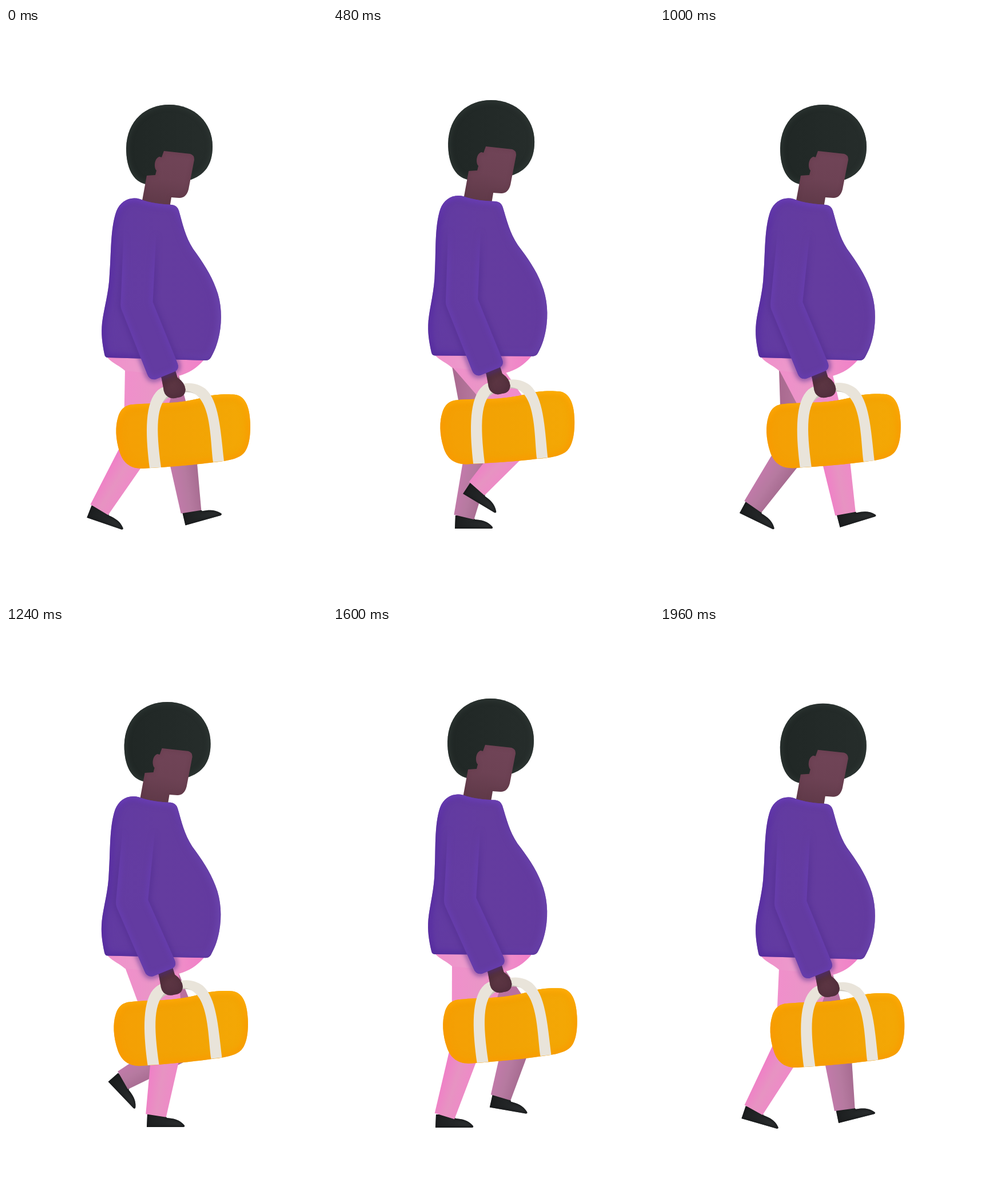
Animation, 561 px wide and 998 px high, one loop 2000 ms. Source, as an HTML page with a canvas:

```html
<!DOCTYPE html>
<html lang="en">
<head>
<meta charset="utf-8">
<title>Walk cycle</title>
<style>
html, body { margin: 0; width: 100%; height: 100%; overflow: hidden; background: #fff; }
canvas { display: block; }
</style>
</head>
<body>
<canvas id="stage" width="561" height="998"></canvas>
<script>
const ctx = document.getElementById('stage').getContext('2d');
const LOOP = 2000, STEP = 40, RAD = Math.PI / 180, SHIN = 135;

// One stride, shared by both legs
const STRIDE = [
  { t: 0, x: 163, y: 842, foot: 19, shin: 31 },
  { t: 90, x: 164, y: 827, foot: 36, shin: 41 },
  { t: 280, x: 196, y: 792, foot: 47, shin: 61 },
  { t: 680, x: 301, y: 826, foot: 6, shin: 12 },
  { t: 1000, x: 324, y: 849, foot: -17, shin: -10 },
  { t: 1240, x: 262, y: 854, foot: 0, shin: 9 },
  { t: 1600, x: 195, y: 855, foot: 0, shin: 17 }
];

const shape = d => new Path2D(d);
const TORSO = shape('M178 576Q173 576 172 570C168 550 166 535 168 515C171 490 180 462 181 430C184 395 182 350 193 320C200 303 216 294 234 299C252 306 272 308 290 309Q299 310 302 319C309 343 313 364 327 386C343 408 358 430 367 455C377 480 378 510 373 535C369 555 364 565 358 576Q355 581 349 581Z');
const HAIR = shape('M244 273C222 268 210 245 210 210C211 161 245 134 285 134C330 134 361 166 361 207C361 240 346 258 320 266Z');
const FACE = shape('M276 215L322 220Q329 222 329 230L319 282Q315 297 303 297L289 296L285 320L235 318L246 258L261 257L263 249C258 244 259 228 268 225L272 226Z');
const PELVIS = shape('M176 570L178 577C188 587 198 590 208 599L302 608C320 603 334 594 346 580L346 570Z');
const SHOE = shape('M-15 -3L-16 20L48 20Q52 19 49 16C41 7 31 5 19 4L15 -3Z');
const HAND = shape('M270 606L296 598L300 611Q313 620 314 632Q313 645 300 646Q290 649 284 645Q276 641 275 628L272 612Z');
const BAG = shape('M222 658C262 654 290 659 340 647C362 640 385 640 400 641C418 643 426 662 427 690C428 715 424 735 415 744C405 754 385 757 365 759C330 764 275 768 240 770C215 771 204 757 199 742C191 718 191 695 196 680C201 664 210 659 222 658Z');
const STRAP_L = shape('M251 769C245 720 241 662 262 637Q270 627 284 625L286 640C262 658 262 700 271 768Z');
const STRAP_R = shape('M304 624C318 618 336 621 349 631C372 652 375 700 381 757L362 759C356 710 360 630 306 634Z');
const STRAP_BACK = shape('M271 652Q282 640 298 637Q322 626 342 642');

const NEAR = { thigh: ['#f08fcb', '#ea95c7', '#f08cca'], shin: ['#f07fc7', '#e793c2', '#ee8ac7'] };
const FAR = { thigh: ['#a9698f', '#b87a9f', '#b9709f'], shin: ['#c37aab', '#b67aa0', '#a66b90'] };

// Cosine over the loop, peaking at the given time
const wave = (t, peak) => Math.cos((t - peak) * 2 * Math.PI / LOOP);

// Body height: two bobs per loop, a slow rise and a quicker fall
function lift(t) {
  const a = 4 * Math.PI * t / LOOP;
  return (1 - Math.cos(a - .28 * (1 - Math.cos(a)))) / 2;
}

// Smooth path through the stride that comes to rest at each turning point
function stride(t) {
  t = (t + LOOP) % LOOP;
  const n = STRIDE.length, out = {};
  const at = i => {
    const k = (i + n) % n;
    return { ...STRIDE[k], t: STRIDE[k].t + LOOP * Math.floor(i / n) };
  };
  let i = n - 1;
  while (STRIDE[i].t > t) i--;
  const [a, b, c, d] = [at(i - 1), at(i), at(i + 1), at(i + 2)];
  const h = c.t - b.t, u = (t - b.t) / h;
  for (const key of ['x', 'y', 'foot', 'shin']) {
    const slope = (p, q, r) => (q[key] - p[key]) * (r[key] - q[key]) > 0
      ? h * (r[key] - p[key]) / (r.t - p.t) : 0;
    const m = slope(a, b, c), k = slope(b, c, d), gap = c[key] - b[key];
    out[key] = b[key] + u * (m + u * (3 * gap - 2 * m - k + u * (m + k - 2 * gap)));
  }
  return out;
}

function ramp(x0, y0, x1, y1, ...colors) {
  const g = ctx.createLinearGradient(x0, y0, x1, y1);
  colors.forEach((c, i) => g.addColorStop(i / (colors.length - 1), c));
  return g;
}

function fill(path, style) {
  ctx.fillStyle = style;
  ctx.fill(path);
}

// Soft shading along an outline, kept inside the clip path
function rim(path, style, width, blur, clip = path) {
  ctx.save();
  ctx.clip(clip, 'evenodd');
  ctx.filter = `blur(${blur}px)`;
  ctx.strokeStyle = style;
  ctx.lineWidth = width;
  ctx.stroke(path);
  ctx.restore();
}

function place(x, y, deg, px, py, draw) {
  ctx.save();
  ctx.translate(x + px, y + py);
  ctx.rotate(deg * RAD);
  ctx.translate(-px, -py);
  draw();
  ctx.restore();
}

function poly(...pts) {
  const p = new Path2D();
  pts.forEach(([x, y]) => p.lineTo(x, y));
  p.closePath();
  return p;
}

function leg({ x, y, foot, shin }, dy, tone) {
  const s = Math.sin(shin * RAD), c = Math.cos(shin * RAD);
  const kx = x + SHIN * s, ky = y - SHIN * c;
  const dx = kx - 246, dh = ky - 589 - dy, len = Math.hypot(dx, dh);
  const ux = dx / len * 27, uy = dh / len * 27;
  const side = (px, py, w) => [px + c * w, py + s * w];

  place(x, y, foot, 0, 0, () => {
    fill(SHOE, ramp(-16, 0, 50, 10, '#1c1e1f', '#232627', '#2e3132'));
    rim(SHOE, '#17191a', 4, 2);
  });

  const thigh = poly([208, 597 + dy], [kx - uy, ky + ux], [kx + uy, ky - ux], [302, 607 + dy]);
  fill(thigh, ramp(208, 0, 302, 0, ...tone.thigh));
  const knee = new Path2D();
  knee.arc(kx, ky, 27, 0, 7);
  fill(knee, tone.thigh[1]);

  const calf = poly(side(kx, ky, -27), side(x, y, -18), side(x, y, 18), side(kx, ky, 27));
  fill(calf, ramp(...side(x, y, -24), ...side(x, y, 24), ...tone.shin));
}

function head() {
  fill(HAIR, ramp(210, 0, 361, 0, '#202725', '#232a28', '#262d2b'));
  rim(HAIR, '#2f3835', 6, 4);
  fill(FACE, ramp(285, 215, 265, 310, '#704457', '#6d4254', '#5f3948'));
  rim(FACE, 'rgba(88,48,62,.4)', 3, 3);
}

function torso() {
  fill(TORSO, ramp(170, 0, 376, 0, '#613aa2', '#643c9f', '#633a9f'));
  rim(TORSO, ramp(170, 0, 376, 0, '#5529a2', '#6038a6', '#6c46b0'), 10, 6);
  rim(TORSO, ramp(0, 298, 0, 345, 'rgba(116,70,196,.7)', 'rgba(116,70,196,0)'), 8, 4);
  rim(TORSO, ramp(0, 555, 0, 580, 'rgba(72,38,136,0)', 'rgba(72,38,136,.5)'), 4, 3);
}

// Shoulder, elbow and wrist each carry their own offset
function arm(sx, sy, ex, ey, wx, wy) {
  const p = new Path2D();
  p.moveTo(206 + sx, 350 + sy);
  p.lineTo(201 + ex, 480 + ey);
  p.quadraticCurveTo(200 + ex, 488 + ey, 204 + ex, 496 + ey);
  p.lineTo(247 + wx, 605 + wy);
  p.quadraticCurveTo(251 + wx, 616 + wy, 262 + wx, 614 + wy);
  p.lineTo(294 + wx, 601 + wy);
  p.quadraticCurveTo(304 + wx, 597 + wy, 300 + wx, 586 + wy);
  p.lineTo(257 + ex, 479 + ey);
  p.lineTo(263 + sx, 350 + sy);
  p.closePath();
  const outside = new Path2D(p);
  outside.rect(0, 0, 561, 998);
  const fade = rgb => ramp(0, 358 + sy, 0, 430 + sy, `rgba(${rgb},0)`, `rgba(${rgb},.7)`);
  rim(p, fade('80,44,144'), 7, 4, outside);
  fill(p, fade('100,60,162'));
  fill(p, ramp(0, 450, 0, 500, 'rgba(99,59,161,0)', '#633ba1'));
  ctx.save();
  ctx.clip(p);
  rim(p, ramp(0, 358 + sy, 0, 430 + sy, 'rgba(104,62,180,0)', 'rgba(104,62,180,.8)'), 8, 4);
  ctx.restore();
}

function bag() {
  ctx.strokeStyle = '#cbc5bb';
  ctx.lineWidth = 8;
  ctx.stroke(STRAP_BACK);
  fill(BAG, ramp(192, 0, 427, 0, '#f59f04', '#f2a304', '#f4a805'));
  rim(BAG, '#f99a00', 11, 6);
  rim(BAG, ramp(0, 640, 0, 700, 'rgba(255,184,10,.8)', 'rgba(255,184,10,0)'), 8, 4);
  for (const s of [STRAP_L, STRAP_R]) fill(s, '#e9e4da');
}

function hand() {
  fill(HAND, ramp(275, 600, 310, 645, '#4a2934', '#5b3542', '#563140'));
  rim(HAND, '#4c2b37', 5, 4);
}

function draw(t) {
  const up = lift(t), drop = -6 * up;
  const swing = (1 - wave(t, 150)) / 2;
  const wx = 3.3 * wave(t, -100) - 3.4, wy = -7.5 * up - swing;
  const tilt = .75 * wave(t, LOOP / 4) - .1;
  // The far leg leads while swinging and lags while it bears weight
  const half = t + LOOP / 2, farTime = half + 85 * wave(half, 300) - 10;

  ctx.fillStyle = '#fff';
  ctx.fillRect(0, 0, 561, 998);
  leg(stride(farTime), drop, FAR);
  leg(stride(t), drop, NEAR);
  place(0, drop, 0, 0, 0, () => {
    fill(PELVIS, ramp(178, 0, 346, 0, '#f08fcb', '#ec9acb', '#ee92c8', '#f17fc8'));
  });
  place(-10 * up, -9 * up, 0, 0, 0, head);
  place(0, drop, -1.35 * up, 260, 577, torso);
  place(wx, wy, tilt, 300, 625, bag);
  place(wx, wy, 0, 0, 0, hand);
  arm(-5 * up, -6.5 * up, -2.1 * up - 8.2 * swing, -5.8 * up, wx, wy);
}

const start = performance.now();
function tick() {
  const t = (performance.now() - start) % LOOP;
  draw(Math.floor(t / STEP) * STEP);
  requestAnimationFrame(tick);
}
tick();
</script>
</body>
</html>
```
